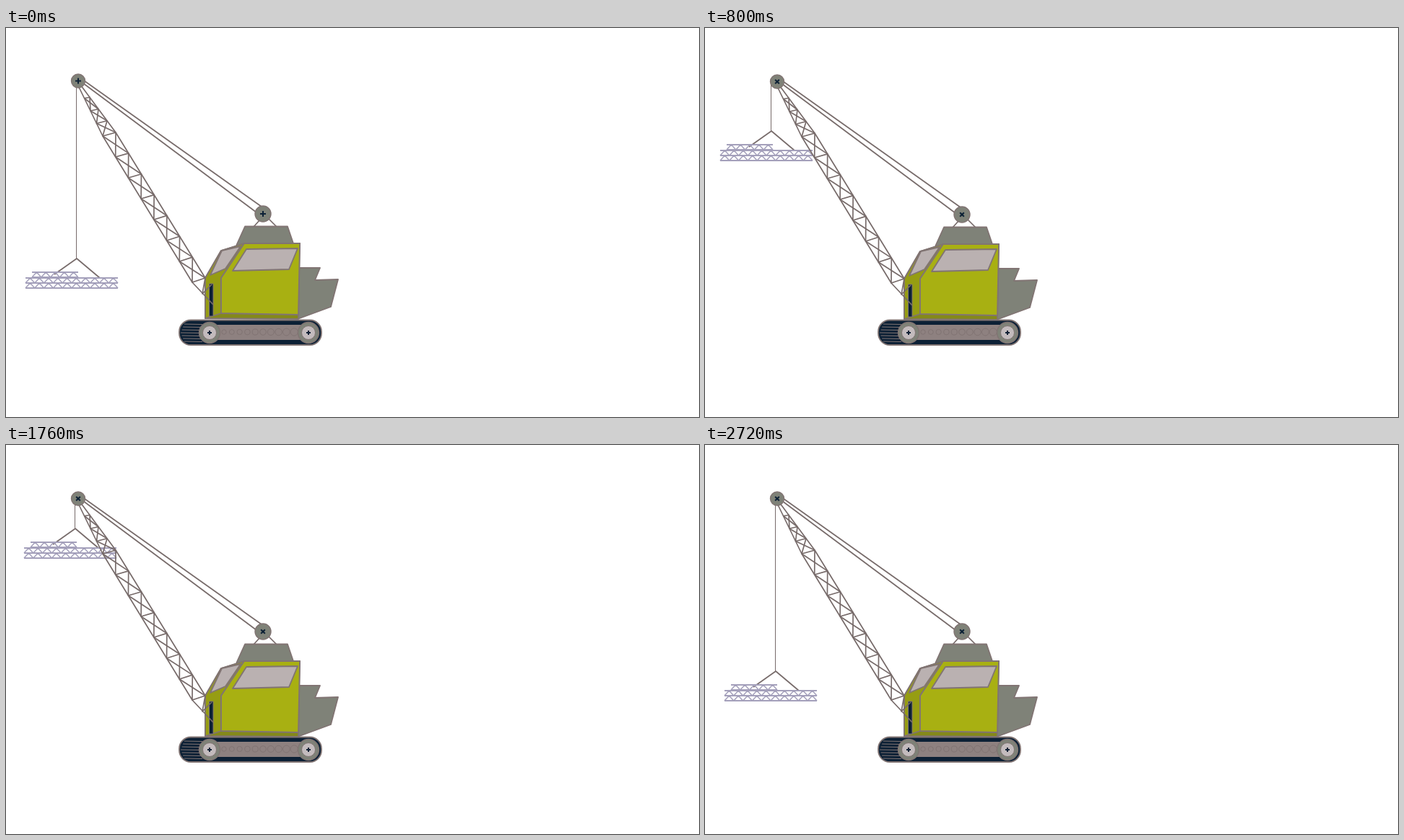
An HTML page with a canvas that plays this animation: 960x540 px, repeating every 2880 ms.

```html
<!DOCTYPE html>
<html lang="en">
<head>
<meta charset="utf-8">
<title>Crane</title>
<style>
  html, body { margin: 0; width: 100%; height: 100%; overflow: hidden; background: #fff; }
  canvas { display: block; }
</style>
</head>
<body>
<canvas id="stage" width="960" height="540"></canvas>
<script>
const ctx = document.getElementById('stage').getContext('2d');
const STEP = 160, STEPS = 18;
const LINE = '#776b6a', EDGE = '#817473', NAVY = '#0c2035', GREY = '#7f8278';
const LIME = '#a8b012', OLIVE = '#969d12', MOSS = '#84891a', GLASS = '#bab1b1';
const PANEL = '#8e8180', STEEL = '#a4a0bb', HUB = '#c3bbbd';

function stroke(color, width) {
  ctx.strokeStyle = color;
  ctx.lineWidth = width;
  ctx.stroke();
}

function path(points) {
  ctx.beginPath();
  points.forEach(([x, y]) => ctx.lineTo(x, y));
}

function line(points, color = LINE, width = 1.7) {
  path(points);
  stroke(color, width);
}

function poly(points, fill, width = 1.8) {
  path(points);
  ctx.closePath();
  ctx.fillStyle = fill;
  ctx.fill();
  stroke(EDGE, width);
}

function disc(x, y, r, fill, width = 1.4) {
  ctx.beginPath();
  ctx.arc(x, y, r, 0, Math.PI * 2);
  ctx.fillStyle = fill;
  ctx.fill();
  stroke(EDGE, width);
}

function cross(x, y, size, angle = 0) {
  ctx.save();
  ctx.translate(x, y);
  ctx.rotate(angle);
  line([[-size, 0], [size, 0]], NAVY, 2);
  line([[0, -size], [0, size]], NAVY, 2);
  ctx.restore();
}

function pulley(x, y, r, angle) {
  disc(x, y, r, GREY);
  cross(x, y, 4, angle);
}

// Point at share t of the way from a to b
const mix = (a, b, t) => a.map((v, i) => v + (b[i] - v) * t);

function truss(x, y, width, cells) {
  const half = width / cells / 2, zig = [];
  for (let i = 0; i <= cells * 2; i++) zig.push([x + i * half, y + (i % 2 ? 0 : 7)]);
  line(zig, STEEL, 1.5);
  line([[x, y], [x + width, y]], STEEL, 2);
  line([[x, y + 7], [x + width, y + 7]], STEEL, 2);
}

function load(left, y, top) {
  const x = left + 71;
  line([[x - 0.5, top], [x - 0.5, y]], LINE, 1);
  line([[x - 31, y + 22], [x, y], [x + 32, y + 27]]);
  truss(left + 9, y + 19, 64, 5);
  truss(left, y + 27, 128, 10);
  truss(left, y + 34, 128, 10);
}

function tracks() {
  ctx.beginPath();
  ctx.roundRect(240, 405.5, 197, 34.5, 16);
  ctx.fillStyle = NAVY;
  ctx.fill();
  stroke(EDGE, 1.8);
  for (let i = 0; i < 7; i++) {
    const y = 411 + i * 4, inset = Math.abs(i - 3) * 1.6;
    line([[242 + inset, y], [272, y + 0.5]], EDGE, 1.2);
  }
  ctx.fillStyle = PANEL;
  ctx.fillRect(282, 412, 137, 21);
  for (let i = 0; i < 10; i++) disc(302 + i * 10.8, 422, 3.2 + i * 0.22, PANEL, 1);
  for (const x of [282, 419]) {
    disc(x, 423, 14.5, GREY);
    disc(x, 423, 9.5, HUB, 1);
    cross(x, 423, 3);
  }
}

function boom() {
  const tip = [[100, 80], [104, 80]], neck = [[134, 150], [152, 145]], foot = [[258, 353], [276, 347]];
  const rungs = [];
  for (let i = 1; i < 4; i++) rungs.push(tip.map((p, side) => mix(p, neck[side], i / 4)));
  for (let i = 0; i <= 7; i++) rungs.push(neck.map((p, side) => mix(p, foot[side], i / 7)));
  line([...rungs.flat(), [272, 369], [285, 356]]);
  rungs.slice(1).forEach((rung, i) => line([rungs[i][0], rung[1]]));
  line([tip[0], neck[0], foot[0], [287, 384]]);
  line([tip[1], neck[1], foot[1]]);
  line([[108, 73], [354, 248]]);
  line([[106, 76], [347, 256]]);
}

function cab() {
  poly([[406, 333], [435, 333], [428, 350], [460, 349], [450, 387], [404, 404]], GREY);
  line([[352, 266], [343, 276]]);
  line([[364, 265], [375, 276]]);
  poly([[331, 275.5], [390, 275.5], [398, 299], [319, 302]], GREY);
  poly([[276, 347], [298, 309], [330, 299], [407, 299], [405, 404], [276, 403]], MOSS);
  poly([[276, 347], [298, 309], [330, 299], [298, 347], [298, 396], [276, 403]], OLIVE);
  poly([[330, 299], [407, 299], [405, 398], [298, 396], [298, 347]], LIME);
  poly([[283, 343], [299, 309], [325, 303], [304, 334]], GLASS);
  poly([[333, 307], [404, 306], [392, 335], [314, 337]], GLASS);
  poly([[281.5, 355], [287, 355], [287, 400], [281.5, 400]], NAVY, 1);
}

// Left edge and hook height of the load: lift, drift at the top, lower again
function pose(k) {
  if (k > 13) k = STEPS - k;
  const swing = (1 - Math.cos(Math.PI * k / 6)) / 2;
  const x = k <= 6 ? Math.ceil(27 - 7 * swing) : Math.min(14 + k, 25);
  const lift = Math.min(1, k ** 2.06 / 31.8);
  return [x, Math.round(320 - 204 * lift)];
}

function draw(k) {
  const bob = Math.round(1 - Math.cos(k * Math.PI / 2)), turn = k * Math.PI / 4;
  const [x, y] = pose(k);
  ctx.fillStyle = '#fff';
  ctx.fillRect(0, 0, 960, 540);
  ctx.lineJoin = 'round';
  load(x, y, 74 + bob);
  tracks();
  ctx.save();
  ctx.translate(0, bob);
  cab();
  boom();
  pulley(100, 73.5, 9.5, turn);
  pulley(356, 258, 11, turn);
  ctx.restore();
}

const start = performance.now();
function tick() {
  const time = Math.max(0, performance.now() - start);
  draw(Math.floor(time / STEP) % STEPS);
  requestAnimationFrame(tick);
}
tick();
</script>
</body>
</html>
```
